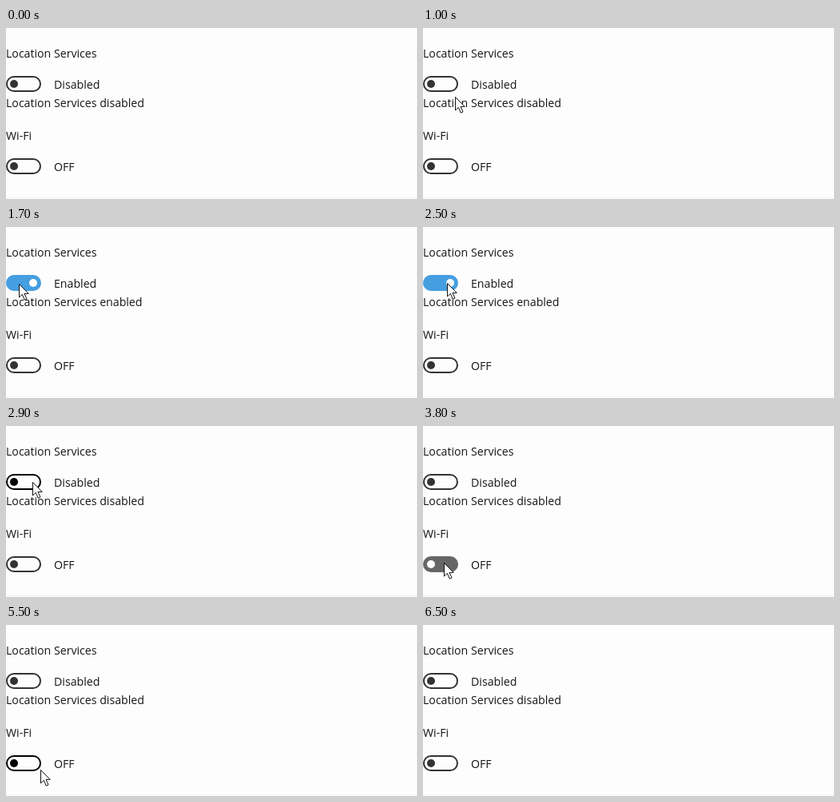
Write an HTML page that moves like this. It is 514 px wide and 214 px high and loops after 6600 ms.

```html
<!DOCTYPE html>
<html lang="en">
<head>
<meta charset="utf-8">
<title>Toggle switches</title>
<style>
  html, body { margin: 0; width: 100%; height: 100%; overflow: hidden; background: #fdfdfd; }
  svg { display: block; }
  text { font: 14.15px "Open Sans", "Noto Sans", sans-serif; fill: #161616; }
  .track { stroke-width: 2; }
</style>
</head>
<body>
<svg width="514" height="214" viewBox="0 0 514 214">
  <rect y="212" width="514" height="1" fill="#f2f2f2"/>
  <text y="37">Location Services</text>
  <g id="location">
    <rect class="track" x="1" y="61" width="42" height="18" rx="9"/>
    <circle cy="70" r="5"/>
    <text x="60" y="76"></text>
  </g>
  <text id="status" y="99"></text>
  <text y="140">Wi-Fi</text>
  <g id="wifi" transform="translate(0 103)">
    <rect class="track" x="1" y="61" width="42" height="18" rx="9"/>
    <circle cy="70" r="5"/>
    <text x="60" y="76"></text>
  </g>
  <path id="cursor" d="M.5.5v16.5l3.8-3.6 3 6.8 2.7-1.2-3-6.6h5.2z" fill="#fff" stroke="#111"/>
</svg>
<script>
const LOOP = 6600, STEP = 100;
const $ = id => document.getElementById(id);

// Pointer path: time, x, y
const path = [
  [500, 118, 206], [1000, 40, 86], [1100, 37, 84], [1300, 16, 71],
  [2100, 16, 71], [2600, 33, 70], [3200, 33, 70], [3700, 26, 171],
  [5400, 26, 171], [5500, 43, 181], [6100, 84, 214]
];

const switches = [
  { el: $('location'), top: 60, on: 1500, off: 2800, labels: ['Disabled', 'Enabled'] },
  { el: $('wifi'), top: 163, on: 3900, off: 4800, labels: ['OFF', 'ON'] }
];

function pointerAt(t) {
  const i = path.findIndex(p => t < p[0]);
  if (i < 1) return null;
  const [t0, x0, y0] = path[i - 1], [t1, x1, y1] = path[i];
  const k = (t - t0) / (t1 - t0);
  return { x: Math.round(x0 + (x1 - x0) * k), y: Math.round(y0 + (y1 - y0) * k) };
}

function knobX(s, t) {
  if (t < s.on || t > s.off) return 10;
  if (t === s.off) return 30;
  return [29, 32.5][(t - s.on) / STEP] ?? 34;
}

function drawSwitch(s, t, p) {
  const on = t >= s.on && t < s.off;
  const pressed = t === s.on - STEP || t === s.off - STEP;
  const hover = p && p.x < 44 && p.y >= s.top && p.y < s.top + 20;
  const line = pressed ? '#666' : on ? '#459ee0' : hover ? '#000' : '#333';
  const [track, knob, label] = s.el.children;
  track.setAttribute('stroke', line);
  track.setAttribute('fill', pressed || on ? line : '#fdfdfd');
  knob.setAttribute('cx', knobX(s, t));
  knob.setAttribute('fill', pressed || on ? '#fff' : line);
  label.textContent = s.labels[+on];
  return on;
}

function draw(now) {
  const t = Math.floor(now % LOOP / STEP) * STEP;
  const p = pointerAt(t);
  const [located] = switches.map(s => drawSwitch(s, t, p));
  $('status').textContent = 'Location Services ' + (located ? 'enabled' : 'disabled');
  $('cursor').setAttribute('visibility', p ? 'visible' : 'hidden');
  if (p) $('cursor').setAttribute('transform', `translate(${p.x} ${p.y})`);
}

const start = performance.now();
function tick() {
  draw(performance.now() - start);
  requestAnimationFrame(tick);
}
tick();
</script>
</body>
</html>
```
